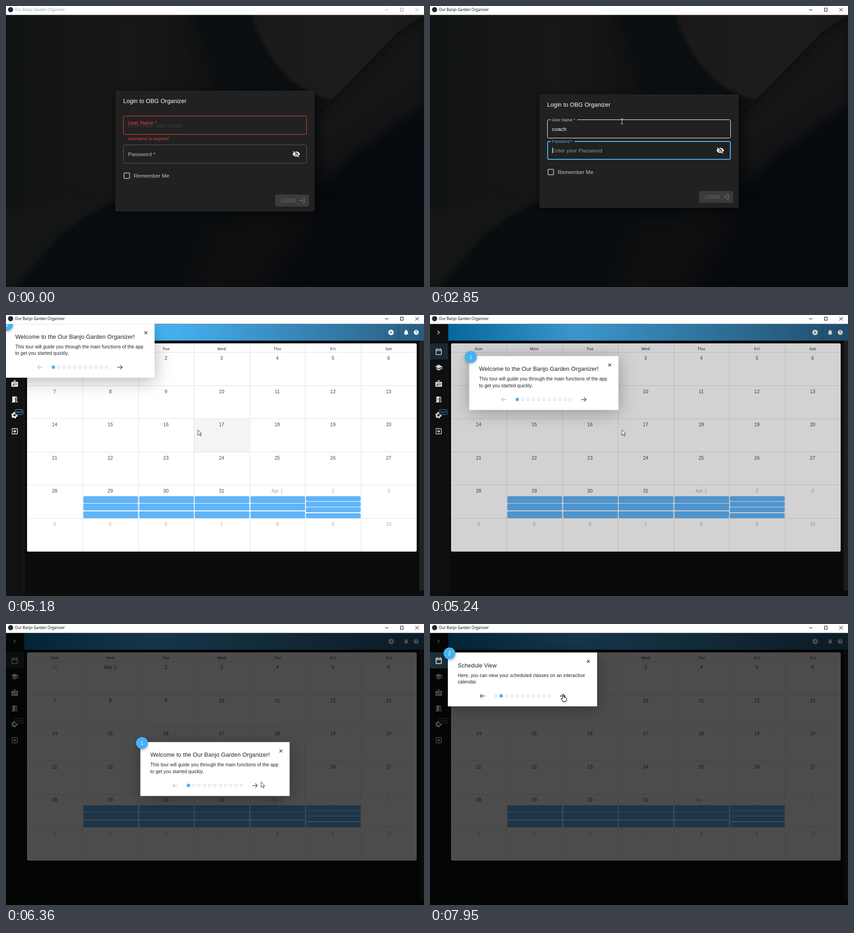
Write an HTML page with a canvas that moves like this. It is 913 by 614 pixels and loops after 8 s.

```html
<!DOCTYPE html>
<html lang="en">
<head>
<meta charset="utf-8">
<title>Our Banjo Garden Organizer</title>
<style>
  html, body { margin: 0; height: 100%; overflow: hidden; background: #0c0c0c; }
  canvas { display: block; }
</style>
</head>
<body>
<canvas id="stage" width="913" height="614"></canvas>
<script>
const W = 913, H = 614, LOOP = 8000;
const RED = '#f44336', BLUE = '#46b1f5', CARD = '#212121';
const APP = 'Our Banjo Garden Organizer';
const USER = 'coach';
const userKeys = [2060, 2120, 2185, 2250, 2460];
const passKeys = [3190, 3400, 3590, 3780, 3910, 4110, 4250, 4380];
const stage = document.getElementById('stage');
let g = stage.getContext('2d');

const ICON = {
  eyeOff: 'M12 7c2.76 0 5 2.24 5 5 0 .65-.13 1.26-.36 1.83l2.92 2.92c1.51-1.26 2.7-2.89 3.43-4.75-1.73-4.39-6-7.5-11-7.5-1.4 0-2.74.25-3.98.7l2.16 2.16C10.74 7.13 11.35 7 12 7zM2 4.27l2.74 2.74C3.08 8.3 1.78 10.02 1 12c1.73 4.39 6 7.5 11 7.5 1.55 0 3.03-.3 4.38-.84L19.73 22 21 20.73 3.27 3 2 4.27zM7.53 9.8l1.55 1.55c-.05.21-.08.43-.08.65 0 1.66 1.34 3 3 3 .22 0 .44-.03.65-.08l1.55 1.55c-.67.33-1.41.53-2.2.53-2.76 0-5-2.24-5-5 0-.79.2-1.53.53-2.2zm4.31-.78l3.15 3.15.02-.16c0-1.66-1.34-3-3-3l-.17.01z',
  login: 'M11 7L9.6 8.4l2.6 2.6H2v2h10.2l-2.6 2.6L11 17l5-5-5-5zm9 12h-8v2h8c1.1 0 2-.9 2-2V5c0-1.1-.9-2-2-2h-8v2h8v14z',
  calendar: 'M19 4h-1V2h-2v2H8V2H6v2H5c-1.1 0-2 .9-2 2v14c0 1.1.9 2 2 2h14c1.1 0 2-.9 2-2V6c0-1.1-.9-2-2-2zm0 16H5V10h14v10zm0-12H5V6h14v2z',
  school: 'M5 13.18v4L12 21l7-3.82v-4L12 17l-7-3.82zM12 3L1 9l11 6 9-4.91V17h2V9L12 3z',
  badge: 'M20 7h-5V4c0-1.1-.9-2-2-2h-2c-1.1 0-2 .9-2 2v3H4c-1.1 0-2 .9-2 2v11c0 1.1.9 2 2 2h16c1.1 0 2-.9 2-2V9c0-1.1-.9-2-2-2zM9 12a1.5 1.5 0 0 1 0 3 1.5 1.5 0 0 1 0-3zm3 6H6c0-3 6-3 6 0zm1-9h-2V4h2v5zm5 7.5h-4V15h4v1.5zm0-3h-4V12h4v1.5z',
  door: 'M14 6v15H3v-2h2V3h9v1h5v15h2v2h-4V6h-3zm-4 5v2h2v-2h-2z',
  exit: 'M10.09 15.59L11.5 17l5-5-5-5-1.41 1.41L12.67 11H3v2h9.67l-2.58 2.59zM19 3H5c-1.11 0-2 .9-2 2v4h2V5h14v14H5v-4H3v4c0 1.1.89 2 2 2h14c1.1 0 2-.9 2-2V5c0-1.1-.9-2-2-2z',
  plus: 'M12 2a10 10 0 0 0 0 20 10 10 0 0 0 0-20zm5 11h-4v4h-2v-4H7v-2h4V7h2v4h4v2z',
  bell: 'M12 22c1.1 0 2-.9 2-2h-4c0 1.1.89 2 2 2zm6-6v-5c0-3.07-1.64-5.64-4.5-6.32V4c0-.83-.67-1.5-1.5-1.5s-1.5.67-1.5 1.5v.68C7.63 5.36 6 7.92 6 11v5l-2 2v1h16v-1l-2-2z',
  help: 'M12 2a10 10 0 0 0 0 20 10 10 0 0 0 0-20zm1 17h-2v-2h2v2zm2.07-7.75l-.9.92C13.45 12.9 13 13.5 13 15h-2v-.5c0-1.1.45-2.1 1.17-2.83l1.24-1.26c.37-.36.59-.86.59-1.41 0-1.1-.9-2-2-2s-2 .9-2 2H8c0-2.21 1.79-4 4-4s4 1.79 4 4c0 .88-.36 1.68-.93 2.25z',
  hand: 'M3.5 10V1.5a1.3 1.3 0 0 1 2.6 0V6.3l4.2.9q1.7.4 1.7 2V12l-1.5 4.6h-6l-3.8-5.4q-.6-1.9 1-1.7z',
  arrow: 'M0 0V16L4 12.5 7 18.5 9.3 17.5 6.5 11.5H11.5Z'
};
for (const k in ICON) ICON[k] = new Path2D(ICON[k]);

const clamp = p => Math.max(0, Math.min(1, p));
const mix = (a, b, k) => a + (b - a) * k;
function bezier(x1, y1, x2, y2, p) {
  p = clamp(p);
  const at = (a, b, s) => 3 * (1 - s) * (1 - s) * s * a + 3 * (1 - s) * s * s * b + s * s * s;
  let lo = 0, hi = 1;
  for (let i = 0; i < 24; i++) {
    const m = (lo + hi) / 2;
    if (at(x1, x2, m) < p) lo = m; else hi = m;
  }
  return at(y1, y2, hi);
}
const easeOut = p => bezier(0, 0, .2, 1, p);
const ease = p => bezier(.25, .1, .25, 1, p);
const smooth = p => bezier(.4, 0, .6, 1, p);
const count = (keys, t) => keys.filter(k => t >= k).length;

// y is the middle of the capital letters
function text(s, x, y, size, color, o = {}) {
  g.font = `${o.weight || 400} ${size}px ${o.font || '"Liberation Sans", Arial, sans-serif'}`;
  g.letterSpacing = (o.space || 0) * size + 'px';
  g.textAlign = o.align || 'left';
  g.fillStyle = color;
  g.fillText(s, x, y + size * .358);
}
function rect(x, y, w, h, color, r = 0) {
  g.fillStyle = color;
  g.beginPath(); g.roundRect(x, y, w, h, r); g.fill();
}
// Outline drawn inside the given box
function frame(x, y, w, h, color, line, r) {
  g.strokeStyle = color; g.lineWidth = line;
  g.beginPath(); g.roundRect(x + line / 2, y + line / 2, w - line, h - line, r); g.stroke();
}
function line(color, width, ...pts) {
  g.strokeStyle = color; g.lineWidth = width;
  g.beginPath();
  for (let i = 0; i < pts.length; i += 2) g.lineTo(pts[i], pts[i + 1]);
  g.stroke();
}
function disc(x, y, r, color) {
  g.fillStyle = color;
  g.beginPath(); g.arc(x, y, r, 0, 7); g.fill();
}
function icon(name, cx, cy, size, color) {
  g.save();
  g.translate(cx - size / 2, cy - size / 2);
  g.scale(size / 24, size / 24);
  g.fillStyle = color; g.fill(ICON[name]);
  g.restore();
}
function shadowed(blur, dy, alpha, fn) {
  g.save();
  g.shadowBlur = blur; g.shadowOffsetY = dy; g.shadowColor = `rgba(0,0,0,${alpha})`;
  fn();
  g.restore();
}
function gradient(x0, x1, ...stops) {
  const f = g.createLinearGradient(x0, 0, x1, 0);
  stops.forEach(([p, c]) => f.addColorStop(p, c));
  return f;
}

// Dark, softly blurred wallpaper, painted once
const wall = document.createElement('canvas');
wall.width = W; wall.height = H;
g = wall.getContext('2d');
rect(0, 0, W, H, gradient(0, W, [0, '#101313'], [.3, '#181715'], [.42, '#151414'], [.52, '#0c0f11'], [1, '#0e0f10']));
[
  ['M395 0C440 110 480 180 560 200L690 215C620 170 560 110 535 0Z', '#0b0f11', 14],
  ['M680 240L860 58 913 24V230L700 400Z', '#141516', 12],
  ['M940 200L760 320 600 470 520 640H940Z', '#06090d', 20],
  ['M15 614L110 508Q170 450 240 426L560 440 420 640H0Z', '#080d10', 3],
  ['M440 470L690 440 560 640H380Z', '#0f0f10', 25],
  ['M-9 450Q60 430 130 400L240 424Q170 450 110 508L15 620H-9Z', '#131615', 6],
  ['M535 14C560 110 630 190 712 206L860 55 920 16V0H530Z', gradient(535, W, [0, '#1a1917'], [.5, '#1f1d1b'], [1, '#1c1b19']), 3]
].forEach(([d, color, blur]) => {
  g.filter = `blur(${blur}px)`;
  g.fillStyle = color; g.fill(new Path2D(d));
});
g.filter = 'blur(1px)';
line('#0b0c0c', 2, 913, 24, 860, 58, 680, 240);
g = stage.getContext('2d');

function field(y, label, hint, value, o) {
  const k = o.shrink;
  frame(256, y, 401, 41, o.border, o.focus ? 2 : 1, 3);
  if (k > .5) {
    g.font = '8.7px "Liberation Sans", Arial, sans-serif';
    g.letterSpacing = '.08px';
    rect(264, y - 1, g.measureText(label).width + 7, 4, CARD);
  }
  if (value) text(value, 266.5, y + 20.5, 11.6, '#fff', { space: .0094 });
  else text(hint, 266.5, y + 20.5, 11.6, `rgba(255,255,255,${.53 * k})`, { space: .0094 });
  text(label, 266.5, y + mix(20.5, .5, k), mix(11.6, 8.7, k), o.color, { space: .0094 });
  if (o.caret) {
    g.letterSpacing = '.109px';
    g.font = '11.6px "Liberation Sans", Arial, sans-serif';
    rect(267 + Math.floor(g.measureText(value).width), y + 14, 1, 13, '#fff');
  }
}

function login(t) {
  g.drawImage(wall, 0, 0);
  const valid = t >= 2060, s = valid ? 8 : 0;
  const onUser = t >= 670 && t < 2620, onPass = t >= 2620;
  const blink = Math.floor((t - 670) / 530) % 2 === 0;
  shadowed(18, 5, .5, () => rect(239, 185 + s, 435, 264 - 2 * s, CARD, 3));
  text('Login to OBG Organizer', 256, 207.5 + s, 12.7, '#fff', { space: .0075 });

  const userColor = !valid ? RED : onUser ? BLUE : '#c4c4c4';
  field(240 + s, 'User Name *', 'Enter your User Name', USER.slice(0, count(userKeys, t)), {
    shrink: t < 670 ? 1 - easeOut((t + 79) / 200) : easeOut((t - 670) / 200),
    focus: onUser, color: userColor, border: onPass ? '#fff' : userColor,
    caret: onUser && (valid || blink)
  });
  if (!valid) text('Username is required', 266.5, 290, 8.7, RED, { space: .033 });

  field(303 - s, 'Password *', 'Enter your Password', '•'.repeat(count(passKeys, t)), {
    shrink: easeOut((t - 2640) / 200),
    focus: onPass, color: onPass ? BLUE : '#c0c0c0', border: onPass ? BLUE : '#5c5c5c',
    caret: onPass
  });
  icon('eyeOff', 634, 323.5 - s, 17.4, '#fff');

  frame(257, 364 - s, 13.5, 13.5, '#c4c4c4', 1.5, 1);
  text('Remember Me', 279, 370.5 - s, 11.6, '#c8c8c8', { space: .0094 });

  const button = (fill, ink) => {
    rect(588, 412 - s, 74, 26, fill, 3);
    text('LOGIN', 600, 425 - s, 10.15, ink, { space: .0286 });
    icon('login', 646.8, 425 - s, 14.5, ink);
  };
  button('#3b3b3b', '#707070');
  g.globalAlpha = smooth((t - 3190) / 250);
  if (g.globalAlpha) button(BLUE, '#0b1a24');
  g.globalAlpha = 1;
}

function calendar(hover) {
  const cw = 851 / 7, rh = 72.5, top = 82;
  rect(46, 62, 851, 455, '#fff', 3);
  if (hover) rect(Math.floor(46 + 3 * cw), top + 2 * rh, cw, rh, '#f4f4f4');
  for (let r = 0; r < 6; r++) rect(46, Math.round(top + r * rh) - 1, 851, 1, '#e0e0e0');
  for (let c = 0; c < 7; c++) {
    const x = Math.floor(46 + c * cw), mid = 46 + (c + .5) * cw - .5;
    if (c) rect(x, 62, 1, 455, '#e0e0e0');
    text('Sun Mon Tue Wed Thu Fri Sat'.split(' ')[c], mid, 73.5, 8.7, '#666', { align: 'center', weight: 700, space: .04 });
    for (let r = 0; r < 6; r++) {
      const n = r * 7 + c;
      const day = n === 0 ? 28 : n > 31 ? n - 31 : n;
      const month = n === 1 ? 'Mar ' : n === 32 ? 'Apr ' : '';
      text(month + day, mid, top + r * rh + 12.5, 10.3, n && n < 32 ? '#444' : '#aaa', { align: 'center', space: .01 });
    }
    if (c > 0 && c < 6) {
      const rows = c === 5 ? 4 : 3, step = c === 5 ? 12.2 : 16.4;
      for (let i = 0; i < rows; i++) rect(x + 2, Math.round(396 + i * step), 119.5, Math.round(step - 1.4), '#60b4f8', 2);
    }
  }
}

function app(t) {
  rect(0, 0, W, H, '#0c0c0c');
  rect(0, 20, 39, 594, '#121214');
  rect(39, 20, 1, 594, '#252527');
  rect(40, 20, 873, 36, gradient(40, W, [0, '#087cc0'], [.32, '#48b6f8'], [1, '#285d80']));
  rect(857, 20, 1, 36, '#1e4a66');
  rect(903, 56, 10, 546, '#222');
  icon('plus', 841, 38, 14.5, '#fff');
  icon('bell', 874, 38, 14.5, '#fff');
  icon('help', 896, 38, 13, '#fff');
  line('#fff', 1.5, 16.5, 34, 20.5, 38, 16.5, 42);
  rect(0, 62, 39, 35, '#1e303d');
  ['calendar', 'school', 'badge', 'door'].forEach((n, i) => icon(n, 19, 80 + i * 34.8, 17.4, '#fff'));
  icon('exit', 19, 254, 17.4, '#fff');
  g.strokeStyle = '#fff';
  g.lineWidth = 3;
  g.beginPath(); g.arc(18.5, 219, 4, 0, 7); g.stroke();
  g.save();
  g.lineWidth = 2;
  g.setLineDash([3.2, 3.08]);
  g.beginPath(); g.arc(18.5, 219, 6, 0, 2 * Math.PI); g.stroke();
  g.restore();
  rect(20, 206, 17, 12, '#121214', 3);
  frame(19.5, 206, 18, 12, BLUE, 1, 3);
  text('WIP', 28.6, 212, 7.6, BLUE, { align: 'center' });
  calendar(t < 5230);

  // Dimmed mask with a window around the toured item
  g.fillStyle = `rgba(0,0,0,${.7 * clamp((t - 5180) / 240)})`;
  g.beginPath();
  g.rect(0, 20, W, 594);
  if (t >= 7220) g.rect(0, 62, 39, 35);
  g.fill('evenodd');
  tour(t);
}

function tour(t) {
  const second = t >= 7220;
  const inK = ease((t - 5180) / 300), outK = ease((t - 7275) / 300);
  const x = mix(mix(-1.5, 293.5, inK), 39, outK);
  const y = mix(mix(19.3, 258, inK), 62.3, outK);
  const arrow = (cx, dir, color) => {
    line(color, 1.4, cx - 5.5 * dir, 95, cx + 5.5 * dir, 95);
    line(color, 1.4, cx + dir, 90.5, cx + 5.5 * dir, 95, cx + dir, 99.5);
  };
  g.save();
  g.translate(x, y);
  shadowed(35, 6, .3, () => rect(0, 0, 326, 117.7, '#fff'));
  shadowed(6, 2, .3, () => disc(3.5, 2, 13, BLUE));
  text(second ? '2' : '1', 3.5, 2, 10.5, '#fff', { align: 'center' });
  text(second ? 'Schedule View' : `Welcome to the ${APP}!`, 21.7, 27.7, 12.7, '#222', { space: .0075 });
  const body = second
    ? ['Here, you can view your scheduled classes on an interactive', 'calendar.']
    : ['This tour will guide you through the main functions of the app', 'to get you started quickly.'];
  body.forEach((s, i) => text(s, 21.7, 49.7 + i * 14.6, 10.15, '#222', { space: .0107 }));
  line('#444', 1.5, 304, 16.5, 310, 22.5);
  line('#444', 1.5, 304, 22.5, 310, 16.5);
  arrow(76, -1, second ? '#555' : '#c4c4c4');
  arrow(250, 1, t >= 6830 ? '#111' : '#555');
  const k = clamp((t - 7220) / 200);
  for (let i = 0; i < 11; i++) {
    const cx = 105 + i * 11.6, on = i === +second;
    const r = i === 0 ? mix(3.7, 2.7, k) : i === 1 ? mix(2.7, 3.7, k) : 2.7;
    if (on) disc(cx, 94.7, r, BLUE);
    else {
      g.strokeStyle = '#ccc'; g.lineWidth = 1;
      g.beginPath(); g.arc(cx, 94.7, r, 0, 7); g.stroke();
    }
  }
  g.restore();
}

// [start, end, x, y]: each move leads to the given point
const moves = [
  [0, 0, 572, 622], [230, 650, 420, 252], [5180, 5180, 419, 251], [5500, 5700, 489, 209],
  [5910, 6360, 557, 345], [6440, 6630, 545, 343], [6780, 6960, 545, 350], [7540, 7950, 291, 153]
];
function pointer(t) {
  let x = 0, y = 0;
  for (const [a, b, nx, ny] of moves) {
    if (t < a) break;
    const k = b > a ? smooth((t - a) / (b - a)) : 1;
    x = mix(x, nx, k); y = mix(y, ny, k);
  }
  const overField = t < 5180 && x > 256 && x < 657 && ((y > 240 && y < 281) || (y > 303 && y < 344));
  if (overField) {
    x = Math.round(x) - .5;
    line('#c8c8c8', 1, x, y - 5, x, y + 5);
    line('#c8c8c8', 1, x - 2.5, y - 5.5, x + 2.5, y - 5.5);
    line('#c8c8c8', 1, x - 2.5, y + 5.5, x + 2.5, y + 5.5);
    return;
  }
  const hand = t >= 6830;
  g.save();
  g.translate(hand ? x - 4.8 : x, y);
  if (!hand) g.scale(.74, .74);
  const shape = hand ? ICON.hand : ICON.arrow;
  g.fillStyle = '#fff'; g.fill(shape);
  g.strokeStyle = '#111'; g.lineWidth = 1.1; g.stroke(shape);
  if (hand) line('#111', .8, 8, 7, 8, 9.5);
  g.restore();
}

function titleBar(active) {
  const ink = active ? '#000' : '#999';
  rect(0, 0, W, 19.5, '#fff');
  disc(10, 8, 5.7, '#1f2a33');
  text(APP, 19.5, 8.5, 8.2, ink, { font: '"Open Sans", "Noto Sans", sans-serif' });
  line(ink, 1, 828, 8.5, 835, 8.5);
  frame(861, 4, 7, 8, ink, 1, 0);
  line(ink, 1, 894, 4.5, 901.5, 12);
  line(ink, 1, 894, 12, 901.5, 4.5);
}

function draw(now) {
  const t = now % LOOP;
  if (t < 5180) login(t); else app(t);
  pointer(t);
  titleBar(t >= 670);
}
let begin;
function tick(now) {
  begin ??= now;
  draw(now - begin);
  requestAnimationFrame(tick);
}
draw(0);
requestAnimationFrame(tick);
</script>
</body>
</html>
```
